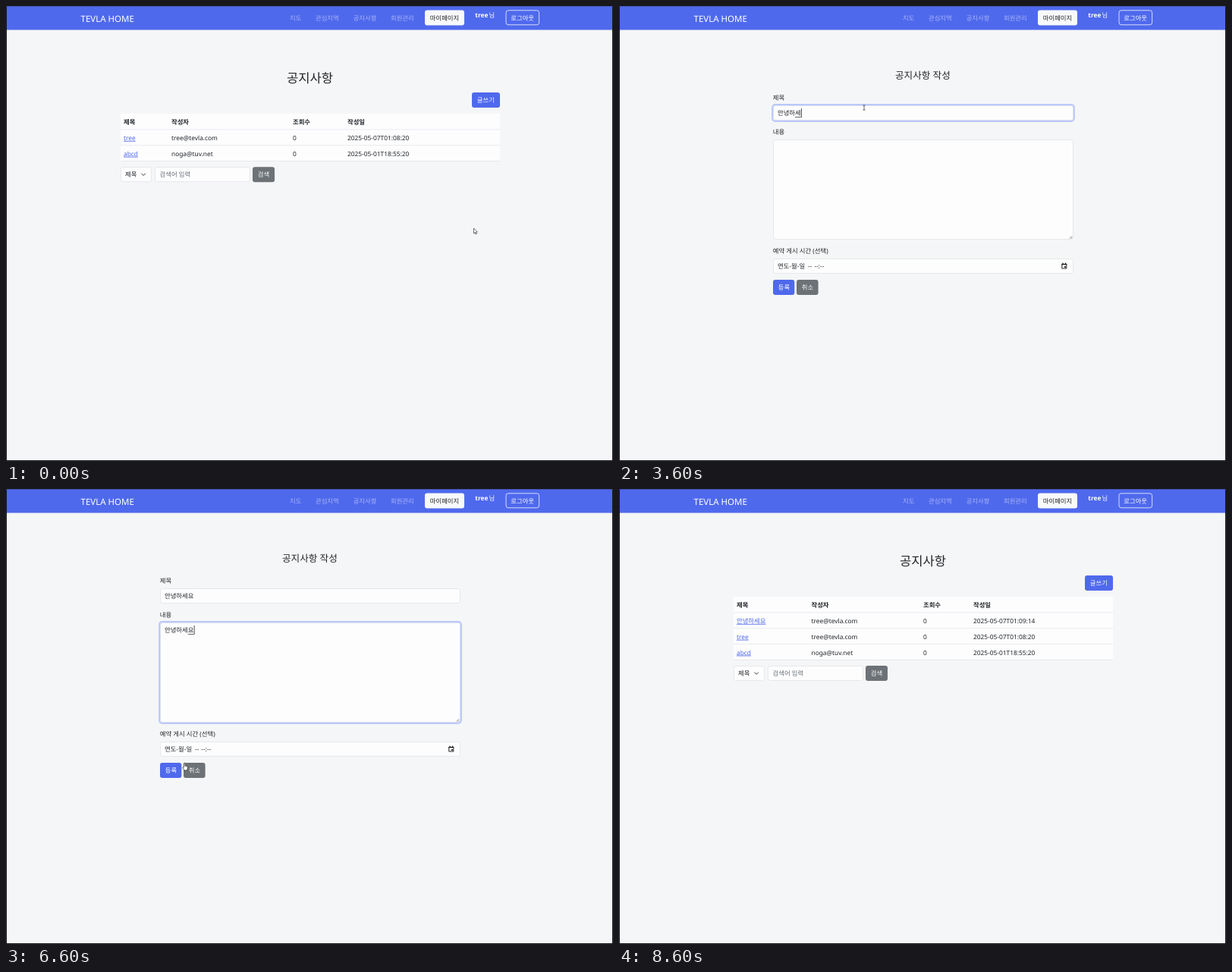
Write an HTML page that moves like this. It is 800x600 px and loops after 9200 ms.

```html
<!DOCTYPE html>
<html lang="ko">
<head>
<meta charset="utf-8">
<title>공지사항</title>
<style>
  html, body { margin: 0; width: 100%; height: 100%; overflow: hidden; background: #f5f6f7; }
  svg { display: block; }
  text {
    font: 8.35px "Noto Sans", "Noto Sans CJK KR", "Noto Sans CJK JP", sans-serif;
    fill: #212529; white-space: pre; text-rendering: geometricPrecision;
  }
</style>
</head>
<body>
<svg id="stage" width="800" height="600" viewBox="0 0 800 600"></svg>
<script>
const LOOP = 9200, STEP = 100;
const BLUE = '#4f69ed', HOVER = '#425acb', GRAY = '#6d7277', EDGE = '#e1e4e8', INK = '#212529';
const CHAR = 7.7;
const stage = document.getElementById('stage');

function add(parent, tag, attrs, content) {
  const el = document.createElementNS('http://www.w3.org/2000/svg', tag);
  for (const k in attrs) el.setAttribute(k, attrs[k]);
  if (content) el.textContent = content;
  parent.appendChild(el);
  return el;
}
const group = parent => add(parent, 'g', {});
const rect = (p, x, y, width, height, fill, more) =>
  add(p, 'rect', { x, y, width, height, fill, ...more });
const text = (p, x, y, s, style = '') => add(p, 'text', { x, y, style }, s);
const path = (p, d, stroke, fill = 'none', width = 1) =>
  add(p, 'path', { d, stroke, fill, 'stroke-width': width, 'stroke-linejoin': 'round' });
const show = (el, on) => el.setAttribute('display', on ? 'inline' : 'none');

function button(p, x, y, w, fill, label, style = 'fill:#fff') {
  const box = rect(p, x, y, w, 20, fill, { rx: 3 });
  text(p, x + 6.8, y + 13, label, style);
  return box;
}
const field = (p, x, y, w, h) =>
  rect(p, x + .5, y + .5, w - 1, h - 1, '#fdfdfe', { rx: 2.8, stroke: EDGE, 'stroke-width': .8 });

function list(cols, rows) {
  const g = group(stage), bottom = 142 + 20.85 * (rows.length + 1);
  text(g, 370, 100.8, '공지사항', 'font-size:16.6px;font-weight:500');
  const write = button(g, 614, 114, 37, BLUE, '글쓰기');
  rect(g, 151, 142, 500, bottom - 142, '#fdfdfe');
  [['제목', '작성자', '조회수', '작성일'], ...rows].forEach((row, r) => {
    const y = 142 + 20.85 * r;
    row.forEach((s, c) => text(g, cols[c], y + 14, s,
      r === 0 ? 'font-weight:700' : c === 0 ? `fill:${BLUE};text-decoration:underline` : ''));
    rect(g, 151, y + 20.6, 500, .7, '#dfe2e6');
  });
  const y = bottom + 7.6;
  field(g, 151, y, 41, 20);
  text(g, 157, y + 13, '제목');
  path(g, `M178.4 ${y + 8.7}l2.7 2.7l2.7 -2.7`, '#343a40');
  field(g, 196, y, 126, 20);
  text(g, 202.6, y + 13, '검색어 입력', 'fill:#666c72');
  button(g, 325, y, 29, GRAY, '검색');
  return { g, write };
}

function input(p, y, h) {
  const box = field(p, 203, y, 396, h);
  const ring = rect(p, 202.2, y - .8, 397.6, h + 1.6, 'none', { rx: 3.6, stroke: '#bcc8f9', 'stroke-width': 2.2 });
  const label = text(p, 209, y + 13, '');
  const caret = rect(p, 0, y + 4, .8, 12, INK);
  const under = rect(p, 0, y + 15.3, CHAR, .7, INK);
  return { box, ring, label, caret, under };
}

// Page header and window edge
rect(stage, 0, 0, 800, 600, '#f5f6f7');
rect(stage, 0, 0, 800, 31.5, BLUE);
text(stage, 98.5, 20.5, 'TEVLA HOME', 'font-size:11.5px;fill:#fff');
[[374, '지도'], [408, '관심지역'], [457.7, '공지사항'], [507, '회원관리']]
  .forEach(([x, s]) => text(stage, x, 19, s, 'fill:#a9b5f6'));
button(stage, 552, 5.5, 52, '#f8f9fa', '마이페이지', 'font-weight:500');
text(stage, 618.3, 15.3, 'tree', 'fill:#fff;font-weight:700');
text(stage, 636.6, 15.3, '님', 'fill:#fff');
const logout = rect(stage, 659, 5.8, 43.6, 19, 'none', { rx: 3, stroke: '#f8f9fa', 'stroke-width': .8 });
const logoutText = text(stage, 665.3, 18.6, '로그아웃', 'fill:#fff');

const before = list([155, 218, 378, 450], [
  ['tree', 'tree@tevla.com', '0', '2025-05-07T01:08:20'],
  ['abcd', 'noga@tuv.net', '0', '2025-05-01T18:55:20']]);
const after = list([155, 253.5, 401, 467], [
  ['안녕하세요', 'tree@tevla.com', '0', '2025-05-07T01:09:14'],
  ['tree', 'tree@tevla.com', '0', '2025-05-07T01:08:20'],
  ['abcd', 'noga@tuv.net', '0', '2025-05-01T18:55:20']]);

// Writing form
const form = group(stage);
text(form, 364, 96.4, '공지사항 작성', 'font-size:12.6px;font-weight:500');
[[124, '제목'], [168.6, '내용'], [326, '예약 게시 시간 (선택)']]
  .forEach(([y, s]) => text(form, 202.8, y, s));
const subject = input(form, 131, 20);
const body = input(form, 176, 132);
path(form, 'M593.8 306.6l3.2 -3.2M595.8 306.8l1.4 -1.4', '#555', 'none', .7);
field(form, 203, 333, 396, 20);
[[209, '연도-월-일'], [249, '--'], [257.5, '--:--']].forEach(([x, s]) => text(form, x, 346, s));
path(form, 'M583.8 340.5h6v5.6h-6z', '#111', 'none', .9);
path(form, 'M583.4 340.6h6.8M585 338.8v1.6M588.6 338.8v1.6', '#111', 'none', 1.2);
rect(form, 587, 343.2, 1.8, 1.8, '#111');
const submit = button(form, 203, 361, 28.3, BLUE, '등록');
button(form, 234, 361, 28.6, GRAY, '취소');

const status = group(stage);
rect(status, 0, 589.5, 82.5, 11, '#1c1d22', { rx: 1.5 });
text(status, 2.5, 597.5, 'localhost:8080/board/form', 'font-size:6px;fill:#4f62ad');

rect(stage, 0, 0, 1, 600, '#15161a');
rect(stage, 799, 0, 1, 600, '#15161a');
rect(stage, 0, 599, 800, 1, '#15161a');
rect(stage, 0, 0, 800, .6, '#39467f');

// Pointers, drawn around their centre
const pointer = group(stage);
const shapes = { arrow: group(pointer), hand: group(pointer), beam: group(pointer) };
path(shapes.arrow, 'M-1.5 -4v7l1.6 -1.5l1.1 2.5l1.1 -.5l-1.1 -2.4h2.2z', '#333', '#fff', .7);
path(shapes.hand, 'M-1.5 1v-5q0 -.9 .8 -.9t.8 .9v3l2.6 .7q1 .3 .9 1.3l-.5 2.5l-.5 1.5h-3.5l-2.3 -3.2q-.3 -1 .7 -.9z', '#333', '#fff', .8);
path(shapes.beam, 'M-1.6 -3h3.2M0 -3v6M-1.6 3h3.2', '#444', 'none', .8);

// Step tables: each entry holds until the next one
const pages = [[0, before.g], [1300, form], [7800, after.g]];
const kinds = [[0, 'arrow'], [600, 'hand'], [1300, 'arrow'], [1600, 'beam'], [6300, 'arrow'],
  [6600, 'hand'], [7800, 'arrow'], [8200, 'hand'], [8400, 'arrow'], [8600, '']];
const words = ['ㅇ', '아', '안', '안녀', '안녕', '안녕ㅎ', '안녕하', '안녕핫', '안녕하세', '안녕하셍', '안녕하세요'];
const keys = times => [[0, ''], ...times.map((t, i) => [t, words[i]])];
const subjectKeys = keys([2000, 2700, 2800, 2900, 3100, 3300, 3400, 3500, 3600, 3700, 3800]);
const bodyKeys = keys([4500, 4600, 4700, 4800, 5000, 5100, 5200, 5300, 5400, 5500, 5600]);
const route = [[0, 618, 297], [200, 622, 262], [400, 630, 180], [600, 633, 133], [800, 633, 127],
  [900, 633, 127], [1000, 548, 160], [1100, 422, 182], [1200, 358, 181], [1400, 329, 156],
  [1700, 322, 137], [1900, 322, 135], [2000, 323, 134], [5700, 323, 134], [5900, 327, 172],
  [6200, 305, 285], [6400, 256, 348], [6600, 236, 366], [7000, 221, 373], [7300, 221, 373],
  [7500, 268, 330], [7600, 307, 298], [7800, 450, 196], [8000, 610, 84], [8100, 664, 44],
  [8200, 684, 24], [8400, 706, 9], [8500, 714, 2], [8600, 717, -8], [LOOP, 717, -8]];

const entry = (table, t) => table.filter(e => e[0] <= t).pop();

function along(t) {
  const i = Math.max(1, route.findIndex(k => k[0] > t));
  const [t0, x0, y0] = route[i - 1], [t1, x1, y1] = route[i];
  const f = (t - t0) / (t1 - t0);
  return [x0 + (x1 - x0) * f, y0 + (y1 - y0) * f];
}

const ramp = (t, start) => Math.min(1, Math.max(0, (t - start + STEP) / 200));

function type(box, table, t, focus, blur) {
  const [since, s] = entry(table, t);
  const active = t >= focus && t < blur;
  const end = 209 + CHAR * s.length;
  box.label.textContent = s;
  box.ring.setAttribute('opacity', t < focus ? 0 : ramp(t, focus) * (1 - ramp(t, blur)));
  box.caret.setAttribute('x', end + .2);
  box.under.setAttribute('x', end - CHAR);
  show(box.caret, active && Math.floor((t - Math.max(since, focus)) / 500) % 2 === 0);
  show(box.under, active && s);
}

function draw(t) {
  const page = entry(pages, t)[1], kind = entry(kinds, t)[1];
  for (const [, g] of pages) show(g, g === page);
  for (const k in shapes) show(shapes[k], k === kind);
  pointer.setAttribute('transform', `translate(${along(t)})`);
  before.write.setAttribute('fill', t >= 600 ? HOVER : BLUE);
  submit.setAttribute('fill', t >= 6700 ? HOVER : BLUE);
  show(status, t >= 700 && t < 1400);
  const over = t >= 8200 && t < 8400;
  logout.setAttribute('fill', over ? '#f8f9fa' : 'none');
  logoutText.style.fill = over ? INK : '#fff';
  type(subject, subjectKeys, t, 1700, 4000);
  type(body, bodyKeys, t, 4000, 7300);
}

function tick() {
  const t = performance.now() % LOOP;
  draw(Math.floor(t / STEP) * STEP);
  requestAnimationFrame(tick);
}
tick();
</script>
</body>
</html>
```
